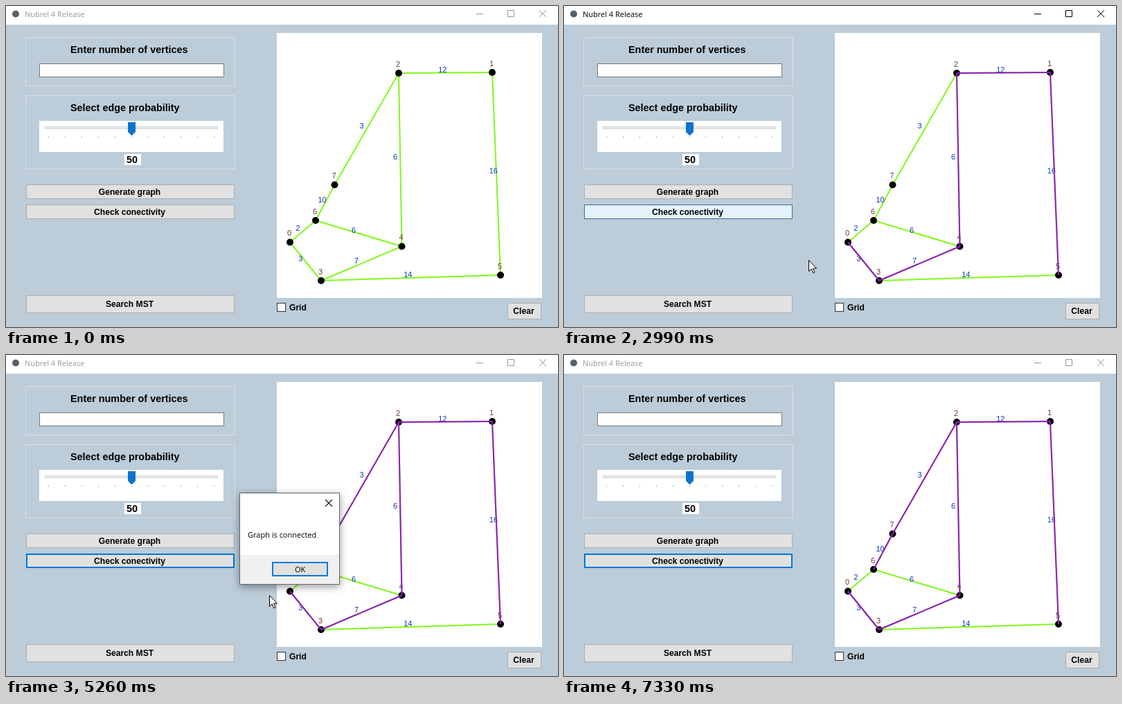
Write an HTML page that moves like this. It is 797 px wide and 464 px high and loops after 7500 ms.

```html
<!DOCTYPE html>
<html lang="en">
<head>
<meta charset="utf-8">
<title>Spanning tree tool</title>
<style>
  html, body { margin: 0; width: 100%; height: 100%; overflow: hidden; background: #bcccd9; }
  svg { display: block; width: 797px; height: 464px; }
  text { font: 11px "Liberation Sans", Arial, sans-serif; white-space: pre; }
  .bold { font-weight: bold; font-size: 12.1px; }
  .head { font-weight: bold; font-size: 14.4px; }
  .ui { font-family: "Open Sans", "Noto Sans", sans-serif; }
  rect { shape-rendering: crispEdges; }
  #dialog { transform-origin: 387px 249px; }
  #panel { filter: drop-shadow(0 3px 6px rgba(0, 0, 0, .4)); }
</style>
</head>
<body>
<svg id="stage" viewBox="0 0 797 464" xmlns="http://www.w3.org/2000/svg"></svg>
<script>
const LOOP = 7500;
const STEP = 76.7;          // pointer sampling, ms
const FIRST_VISIT = 990, VISIT_GAP = 500;
const PRESS = 830, OPEN = 4550, OK_PRESS = 5870, CLOSE = 6023, CLOSED = 6330;
const BLUE = '#0078d7', GREY = '#e1e1e1', HOVER = '#e5f1fb', DOWN = '#cce4f7';
const stage = document.getElementById('stage');

function add(tag, attrs, parent = stage) {
  const el = document.createElementNS('http://www.w3.org/2000/svg', tag);
  for (const k in attrs) el.setAttribute(k, attrs[k]);
  parent.appendChild(el);
  return el;
}

// Box given by its outer edges; the border lies inside.
function box(x, y, r, b, fill, stroke, parent) {
  const el = add('rect', {}, parent);
  el.edges = [x, y, r, b];
  return paint(el, fill, stroke);
}

function paint(el, fill, stroke, width = 1) {
  const [x, y, r, b] = el.edges;
  const inset = stroke ? width / 2 : 0;
  const attrs = {
    x: x + inset, y: y + inset,
    width: r - x - 2 * inset, height: b - y - 2 * inset,
    fill, stroke: stroke || 'none', 'stroke-width': width
  };
  for (const k in attrs) el.setAttribute(k, attrs[k]);
  return el;
}

function label(str, x, y, attrs, parent) {
  const el = add('text', { x, y, ...attrs }, parent);
  el.textContent = str;
  return el;
}

function button(str, x, y, r, b) {
  const face = box(x, y, r, b, GREY, '#adadad');
  label(str, (x + r) / 2 - 1, (y + b) / 2 + 4.3, { class: 'bold', 'text-anchor': 'middle' });
  return face;
}

function group(title, y, b) {
  box(28, y, 331, b, 'none', '#dcdfe2');
  label(title, 93, y + 23, { class: 'head' });
}

const cross = (x, y, attrs, parent) =>
  add('path', { d: `M${x} ${y}l10 10m0-10l-10 10`, ...attrs }, parent);

// Window frame
box(0, 0, 797, 27, '#fff');
add('circle', { cx: 14, cy: 11.5, r: 5, fill: '#56616c' });
const caption = label('Nubrel 4 Release', 27, 16, { class: 'ui' });
const controls = add('g', { fill: 'none' });
add('path', { d: 'M679 11.5h10M724.5 6.5h9v9h-9z' }, controls);
cross(770, 6, {}, controls);

// Left column
group('Enter number of vertices', 45, 116);
box(48, 83, 315, 103, '#fff', '#7a7a7a');

group('Select edge probability', 129, 236);
box(48, 166, 314, 211, '#fff');
box(56, 174, 306, 178, '#e7eaea', '#d6d6d6');
for (let i = 0; i <= 10; i++) {
  const x = Math.round(61 + i * 23.9);
  box(x, 188, x + 1, 191, '#c4c4c4');
}
add('path', { d: 'M176 168h11v14l-5 5h-1l-5-5z', fill: '#0c74d0' });
box(171, 214, 195, 230, '#fff');
label('50', 174, 227, { class: 'head' });

button('Generate graph', 29, 258, 330, 279);
const check = button('Check conectivity', 29, 287, 330, 308);
button('Search MST', 29, 418, 330, 444);

// Graph area
box(391, 39, 774, 422, '#fff');
box(391, 429, 404, 442, '#fff', '#333');
label('Grid', 409, 440, { class: 'bold' });
button('Clear', 724, 429, 773, 453);

const nodes = [
  [410, 341.5], [702, 96], [567, 97], [455, 397],
  [571.5, 347.5], [714, 389], [447, 310], [474.5, 258.5]
];
// from, to, weight
const edges = [
  [2, 1, 12], [2, 7, 3], [2, 4, 6], [1, 5, 16], [7, 6, 10],
  [0, 6, 2], [6, 4, 6], [0, 3, 3], [3, 4, 7], [3, 5, 14]
];

function line([a, b], stroke) {
  const [x1, y1] = nodes[a], [x2, y2] = nodes[b];
  return add('line', { x1, y1, x2, y2, stroke, 'stroke-width': 2 });
}

// Depth-first walk, lowest vertex first
function walk(from, seen = new Set([from]), path = []) {
  nodes.forEach((_, to) => {
    const linked = edges.some(e => e[0] + e[1] === from + to && (e[0] === from || e[1] === from));
    if (!linked || seen.has(to)) return;
    seen.add(to);
    path.push([from, to]);
    walk(to, seen, path);
  });
  return path;
}

for (const e of edges) line(e, '#80f81c');
nodes.forEach(([cx, cy], i) => {
  add('circle', { cx, cy, r: 5, fill: '#000' });
  label(i, cx - 4, cy - 9.5, { fill: '#6b3a30' });
});
for (const [a, b, w] of edges) {
  const [x, y] = [0, 1].map(i => (nodes[a][i] + nodes[b][i]) / 2);
  label(w, x - 10.3, y - 0.7, { fill: '#0a3cb4' });
}
const trail = walk(0).map(e => line(e, '#9418c6'));

// Message box
const dialog = add('g', { id: 'dialog' });
const panel = add('g', { id: 'panel' }, dialog);
box(337, 199, 482, 332, '#fff', '#626a74', panel);
box(338, 289, 481, 331, '#f0f0f0', null, dialog);
const closer = cross(461, 209, { stroke: '#111', 'stroke-width': 1.1 }, dialog);
label('Graph is connected', 349, 264, { class: 'ui' }, dialog);
const ok = box(384, 299, 465, 320, GREY, BLUE, dialog);
label('OK', 417, 314, { class: 'ui' }, dialog);

// Pointer
const halo = add('circle', { r: 15.5, fill: '#f0f02c', 'fill-opacity': 0.6 });
const pointer = add('path', {
  d: 'M.5.5v16l3.7-3.5l2.5 5.8l2.3-1l-2.5-5.6h5z',
  fill: '#fff', stroke: '#000'
});

// first sample, last sample, place reached
const moves = [
  [140, 680, 306, 304], [1140, 1830, 353, 367], [5100, 5790, 422, 300],
  [6253, 6560, 536, 373], [6640, 6952, 694, 452]
];

function pointerAt(t) {
  let x = 602, y = 477;
  for (const [t0, t1, tx, ty] of moves) {
    if (t < t0) break;
    const count = Math.round((t1 - t0) / STEP) + 1;
    const done = Math.min(1, (Math.floor((t - t0) / STEP) + 1) / count);
    x = Math.round(tx + (x - tx) * (1 - done) ** 1.4);
    y = Math.round(ty + (y - ty) * (1 - done));
  }
  return [x, y];
}

const within = (t, a, b) => t >= a && t < b;
const over = ([x, y], { edges: [l, top, r, b] }) => within(x, l, r) && within(y, top, b);
const show = (el, on) => el.setAttribute('visibility', on ? 'visible' : 'hidden');

function dialogAlpha(t) {
  if (t < OPEN) return 0;
  const rise = 0.55 + (t - OPEN) / 530;
  const fall = (CLOSED - t) / (CLOSED - CLOSE);
  return Math.max(0, Math.min(1, rise, fall));
}

function draw(t) {
  const pos = pointerAt(t);
  const active = within(t, PRESS, OPEN) || within(t, CLOSE, 7330);
  const ink = active ? '#000' : '#999';
  caption.setAttribute('fill', ink);
  controls.setAttribute('stroke', ink);

  if (t >= OPEN) paint(check, GREY, BLUE, 2);
  else if (t >= FIRST_VISIT) paint(check, HOVER, '#3b6c98');
  else if (t >= PRESS) paint(check, DOWN, '#1f4a70');
  else if (over(pos, check)) paint(check, HOVER, BLUE);
  else paint(check, GREY, '#adadad');

  trail.forEach((el, i) => show(el, t >= FIRST_VISIT + i * VISIT_GAP));

  const alpha = dialogAlpha(t);
  show(dialog, alpha > 0);
  show(closer, alpha > 0 && t < CLOSE);
  dialog.style.opacity = alpha;
  dialog.style.transform = `scale(${1 - 0.044 * (1 - alpha)})`;
  if (t >= OK_PRESS) paint(ok, DOWN, '#2b6ca8');
  else if (over(pos, ok)) paint(ok, HOVER, BLUE);
  else paint(ok, GREY, BLUE, 2);

  for (const el of [pointer, halo]) el.setAttribute('transform', `translate(${pos})`);
  show(pointer, within(t, 140, 7030));
  show(halo, within(t, PRESS, FIRST_VISIT) || within(t, OK_PRESS, CLOSE));
}

function tick() {
  draw(performance.now() % LOOP);
  requestAnimationFrame(tick);
}
tick();
</script>
</body>
</html>
```
